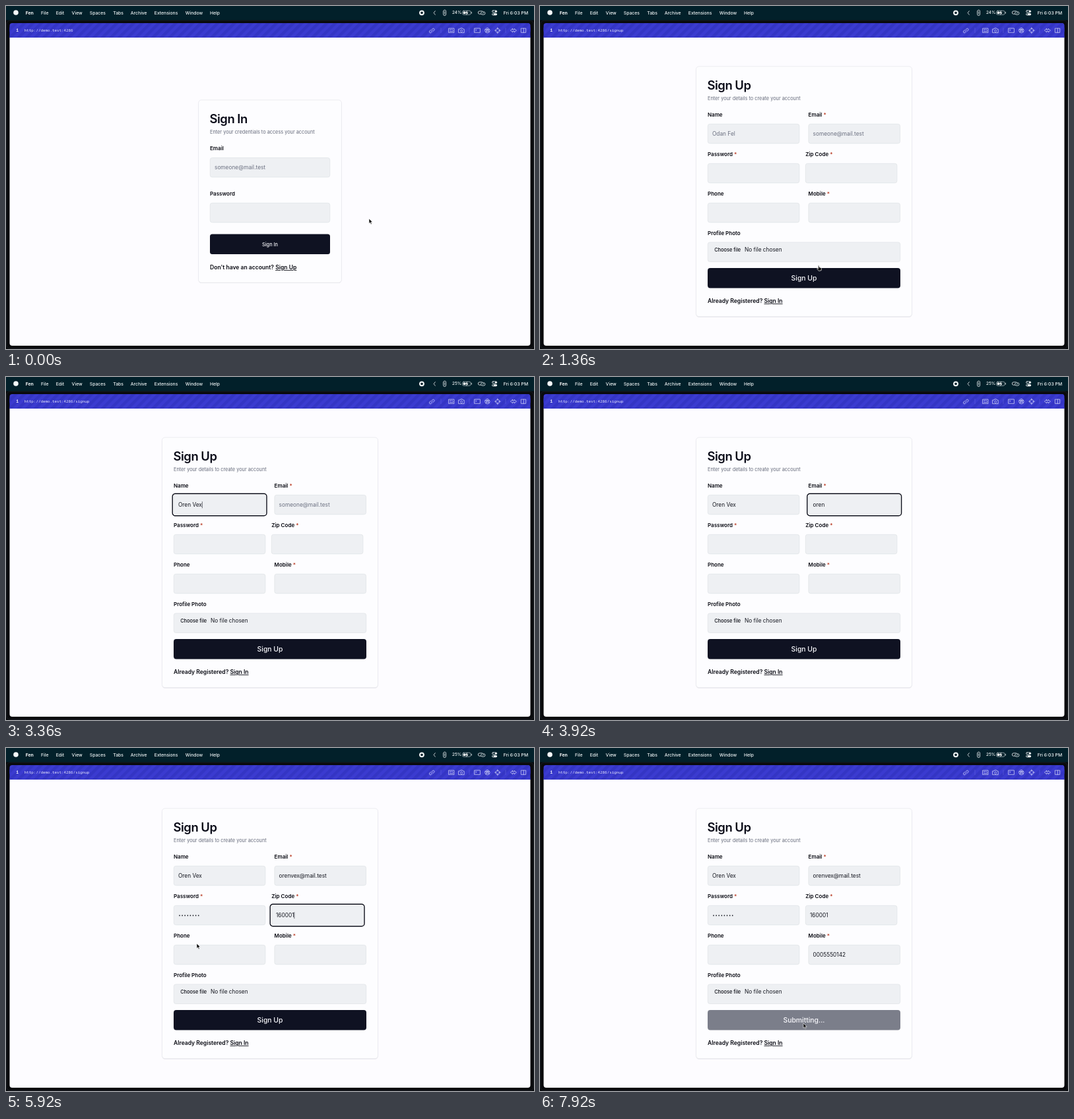
These frames come from a looping animation (800 by 521 pixels, 8 s). An HTML page:

```html
<!DOCTYPE html>
<html lang="en">
<head>
<meta charset="utf-8">
<title>Sign up form</title>
<style>
  html, body { margin: 0; width: 100%; height: 100%; overflow: hidden; background: #07090c; }
  svg { display: block; width: 800px; height: 521px; font-family: Inter, "Open Sans", sans-serif; }
  text { white-space: pre; }
  .menu { font-size: 6.8px; font-weight: 500; fill: #f4f7f8; }
  .mono { font: 5.87px "Noto Sans Mono", "DejaVu Sans Mono", monospace; fill: #e6e6fc; }
  .title { font-size: 18.4px; font-weight: 600; letter-spacing: -.025em; fill: #0a0b18; }
  .sub { font-size: 7.33px; fill: #666b7b; }
  .label { font-size: 8px; font-weight: 600; fill: #0b0c14; }
  .foot { font-size: 8.56px; font-weight: 600; fill: #0b0c14; }
  .foot tspan { text-decoration: underline; }
  .value { font-size: 8.3px; fill: #14161f; }
  .hint { fill: #6b7080; }
  .btn { font-weight: 500; fill: #f8f8fc; text-anchor: middle; }
  .field { fill: #eef0f3; stroke: #dfe2e6; stroke-width: .7; }
  .star { fill: #b93a22; }
  .line { fill: none; stroke: #f4f7f8; stroke-width: .8; stroke-linecap: round; stroke-linejoin: round; }
  .tool { stroke: #d5d6fa; stroke-width: .75; }
</style>
</head>
<body>
<svg id="stage" viewBox="0 0 800 521"></svg>
<script>
const stage = document.getElementById('stage');
const $ = id => document.getElementById(id);

const text = (x, y, cls, str, extra = '') => `<text x="${x}" y="${y}" class="${cls}" ${extra}>${str}</text>`;
const rect = (x, y, w, h, r, attrs) => `<rect x="${x}" y="${y}" width="${w}" height="${h}" rx="${r}" ${attrs}/>`;
const field = (x, y, w, h = 30) => rect(x + .3, y + .3, w - .6, h - .6, 3, 'class="field"');
const line = (d, cls = '') => `<path class="line ${cls}" d="${d}"/>`;
const star = '<tspan class="star"> *</tspan>';
const card = (x, y, w, h) =>
  rect(x, y + .9, w, h, 4.5, 'fill="#e6e6eb"') +
  rect(x, y, w, h, 4.5, 'fill="#fdfdff" stroke="#e8e8ed" stroke-width=".8"');

const menuItems = [['File', 53], ['Edit', 75.7], ['View', 99.6], ['Spaces', 126.8], ['Tabs', 162.3],
  ['Archive', 188.8], ['Extensions', 224.8], ['Window', 271.7], ['Help', 309]];

const menuBar = `
  <rect width="800" height="21.5" fill="#02202a"/>
  <circle cx="15" cy="10" r="3.8" fill="#f4f7f8"/>
  ${text(29.7, 12.5, 'menu', 'Fen', 'style="font-weight:700"')}
  ${menuItems.map(([s, x]) => text(x, 12.5, 'menu', s)).join('')}
  <circle cx="630" cy="10.3" r="3.9" fill="#f4f7f8"/><rect x="628.4" y="8.7" width="3.2" height="3.2" rx=".6" fill="#02202a"/>
  ${line('M650.3 7.6l-2.2 2.8 2.2 2.8')}
  ${line('M662.6 8v4.5a2 2 0 0 0 4 0v-4a1.9 1.9 0 0 0-3.8-1M664.6 8.5v3.6')}
  <text id="charge" x="676" y="12.4" class="menu" style="font-size:6.4px"></text>
  ${rect(691.6, 7.2, 12.4, 6, 1.8, 'class="line" style="stroke:#aab7bb"')}
  <rect x="692.8" y="8.4" width="3.6" height="3.6" rx=".8" fill="#fff"/>
  <path d="M699 6.5l-3 4.2h2l-.8 3.4 3.4-4.4h-2.1z" fill="#fff"/>
  ${line('M705.4 9.2v2')}
  ${line('M719.5 12.2h-2a2.2 2.2 0 0 1 0-4.4h3.6a2.2 2.2 0 0 1 1.6 3.7M721 8.9a2.2 2.2 0 0 0 1.2 4.2h1.6a2.2 2.2 0 0 0 0-4.4')}
  ${rect(736.6, 6.8, 7.2, 2.8, 1.4, 'class="line"')}<circle cx="742.2" cy="8.2" r="1.2" fill="#fff"/>
  ${rect(736.3, 10.9, 7.8, 3.3, 1.6, 'fill="#f4f7f8"')}<circle cx="738.1" cy="12.5" r="1" fill="#02202a"/>
  ${text(753.7, 12.5, 'menu', 'Fri 6:03 PM')}`;

const icon = (d) => line(d, 'tool');
const toolBar = `
  <path d="M5.5 48V30a4 4 0 0 1 4-4h781a4 4 0 0 1 4 4v18z" fill="#3b3bd0"/>
  <path d="M5.5 48V30a4 4 0 0 1 4-4h781a4 4 0 0 1 4 4v18z" fill="url(#stripes)"/>
  ${text(15.3, 39.3, 'mono', 'i', 'style="font-weight:700;font-size:6.5px"')}
  <text id="url" x="27.8" y="39.1" class="mono"></text>
  ${icon('M644 38.6l2.2-2.2M643.4 36.4l-1.6 1.6a1.7 1.7 0 0 0 2.4 2.4l1.3-1.3M644.8 35.9l1.4-1.4a1.7 1.7 0 0 1 2.4 2.4l-1.6 1.6')}
  ${icon('M671 34h8v6.4h-8zM672.5 36h2M672.5 38.6h5M676 35.4l1.6 2')}
  ${icon('M686 35h2l.8-1.3h2.6l.8 1.3h2v5.6H686zM690.1 36.2a1.6 1.6 0 1 0 .1 0')}
  ${icon('M710 33.9h8.4v6.4H710zM711.6 35.6l1.2 1-1.2 1')}
  ${icon('M729.3 33.4a3.7 3.7 0 1 0 .1 0M729.3 35.4a1.7 1.7 0 1 0 .1 0M726 35.5h6.6M727 40l2-3.6M732 39.8l-2-3.4')}
  ${icon('M744.8 34a3.1 3.1 0 1 0 .1 0M744.8 32.8v2.6M744.8 39v2.6M740.6 37.1h2.6M746.6 37.1h2.6')}
  ${icon('M767.6 34.3l-3.2 2.8 3.2 2.8v-1.6h2.6v1.6l3.2-2.8-3.2-2.8v1.6h-2.6z')}
  ${icon('M780.7 34h7v6.3h-7zM784.2 34v6.3')}
  ${[659, 702, 757].map(x => `<path d="M${x} 33v8" stroke="#5c5ddd" stroke-width=".7"/>`).join('')}`;

const signIn = `
  ${card(291.6, 142.8, 216.8, 277.4)}
  ${text(308.5, 178.4, 'title', 'Sign In')}
  ${text(309, 193.5, 'sub', 'Enter your credentials to access your account')}
  ${text(309, 219.3, 'label', 'Email')}
  ${field(309, 230.3, 182)}
  ${text(316, 248.4, 'value hint', 'someone@mail.test')}
  ${text(309, 287.8, 'label', 'Password')}
  ${field(309, 299, 182)}
  ${rect(309, 346.6, 182, 30.4, 3.5, 'fill="#0f1222"')}
  ${text(400, 364.5, 'btn', 'Sign In', 'style="font-size:7.4px"')}
  ${text(309, 400, 'foot', "Don't have an account? <tspan>Sign Up</tspan>")}`;

const inputs = {
  name:   { x: 254,   y: 179, word: 'Oren Vex', start: 2640, step: 90 },
  email:  { x: 406.6, y: 179, word: 'orenvex@mail.test', start: 3680, step: 70 },
  pass:   { x: 254,   y: 239, word: '********', start: 4960, step: 50 },
  zip:    { x: 402,   y: 239, word: '160001', start: 5440, step: 75 },
  mobile: { x: 406.6, y: 299, word: '0005550142', start: 6340, step: 60 }
};
const inputW = 139.2;

const signUp = `
  ${card(236.4, 91.8, 327.2, 380)}
  ${text(253.5, 127.3, 'title', 'Sign Up')}
  ${text(254, 142.6, 'sub', 'Enter your details to create your account')}
  ${text(254, 168, 'label', 'Name')}
  ${text(406.6, 168, 'label', 'Email' + star)}
  ${text(254, 228, 'label', 'Password' + star)}
  ${text(402.3, 228, 'label', 'Zip Code' + star)}
  ${text(254, 288, 'label', 'Phone')}
  ${text(406.6, 288, 'label', 'Mobile' + star)}
  ${text(254, 347.7, 'label', 'Profile Photo')}
  <g id="ring">
    ${rect(-1.8, -1.8, inputW + 3.6, 33.6, 4.2, 'fill="#fff" stroke="#0c0e1a" stroke-width="1.4"')}
  </g>
  ${Object.values(inputs).map(f => field(f.x, f.y, inputW)).join('')}
  ${field(254, 299, inputW)}
  ${field(254, 358.6, 292, 30.2)}
  ${text(264.2, 372.7, 'label', 'Choose file', 'style="font-size:7.4px;font-weight:500"')}
  ${text(310, 372.9, 'value', 'No file chosen')}
  ${Object.keys(inputs).map(k => text(inputs[k].x + 7, inputs[k].y + 18.4, 'value', '', `id="${k}"`)).join('')}
  <path id="dots" fill="none" stroke="#14161f" stroke-width="1.7" stroke-linecap="round" stroke-dasharray="0 4.1"/>
  <rect id="caret" width=".6" height="10" fill="#14161f"/>
  <rect id="submit" x="254" y="398" width="292" height="30.4" rx="4"/>
  ${text(400, 416.9, 'btn', '', 'id="submitText" style="font-size:10.4px"')}
  ${text(254, 451, 'foot', 'Already Registered? <tspan>Sign In</tspan>')}`;

const pointers = `
  <g id="pointer" stroke-linejoin="round">
    <path id="arrow" d="M0 0v7.4l1.7-1.6 1.2 2.7 1.3-.6-1.2-2.6h2.3z" fill="#0a0a0a" stroke="#fff" stroke-width=".6"/>
    <path id="hand" d="M-.6 .2c.5-.5 1.1-.2 1.3 .4l.6 2.3 2 .5c.9 .3 1.2 .8 1.1 1.7l-.3 2.6-3.6 .7-2.6-3c-.4-.7 .2-1.2 .9-.8l.8 .5z" fill="#0a0a0a" stroke="#fff" stroke-width=".7"/>
    <path id="beam" d="M-1.6-4q1.6 0 1.6 1.1 0-1.1 1.6-1.1M0-2.9v5.8M-1.6 4q1.6 0 1.6-1.1 0 1.1 1.6 1.1M-.8 .8h1.6" fill="none" stroke="#0a0a0a" stroke-width=".75"/>
  </g>`;

stage.innerHTML = `
  <defs><pattern id="stripes" width="9" height="9" patternUnits="userSpaceOnUse" patternTransform="rotate(45)">
    <rect width="4.5" height="9" fill="#3435c4"/></pattern></defs>
  <rect width="800" height="521" fill="#07090c"/>
  ${rect(.6, 22, 798.8, 498.4, 6, 'fill="#090a0d" stroke="#20252a" stroke-width=".7"')}
  ${menuBar}${toolBar}
  <path d="M5.5 48h789v464a4 4 0 0 1-4 4h-781a4 4 0 0 1-4-4z" fill="#fdfcff"/>
  <g id="signIn">${signIn}</g><g id="signUp">${signUp}</g>${pointers}`;

// Pointer stops: time, x, y
const stops = [[0, 550, 323], [100, 550, 323], [720, 424, 396], [1200, 424, 396], [1340, 422, 394], [1480, 422, 394],
  [2160, 284.5, 193.5], [5800, 284.5, 193.5], [5920, 289, 297], [6160, 440, 313], [6860, 440, 313],
  [7190, 394, 428], [7220, 394, 428], [7480, 399, 418], [8000, 399, 418]];
// Focus changes: time, input
const focus = [[0, ''], [2280, 'name'], [3560, 'email'], [4900, 'pass'], [5380, 'zip'], [6200, 'mobile'], [7600, '']];

const clamp = (v, lo, hi) => Math.min(hi, Math.max(lo, v));
const show = (id, on) => { $(id).style.display = on ? '' : 'none'; };
const put = (id, s) => { if ($(id).textContent !== s) $(id).textContent = s; };

function pointerAt(t) {
  const i = Math.max(1, stops.findIndex(s => s[0] > t));
  const [t0, x0, y0] = stops[i - 1], [t1, x1, y1] = stops[i];
  const p = (t - t0) / (t1 - t0), e = p * p * (3 - 2 * p);
  return [x0 + (x1 - x0) * e, y0 + (y1 - y0) * e];
}

function draw(t) {
  const onSignUp = t >= 960, sending = t >= 7600;
  show('signIn', !onSignUp);
  show('signUp', onSignUp);
  put('url', 'http://demo.test:4286' + (onSignUp ? '/signup' : ''));
  put('charge', t < 3000 ? '24%' : '25%');

  const typed = {};
  for (const [k, f] of Object.entries(inputs)) {
    typed[k] = clamp(Math.floor((t - f.start) / f.step) + 1, 0, f.word.length);
    if (k === 'pass') continue;
    const hint = { name: 'Odan Fel', email: 'someone@mail.test' }[k] || '';
    put(k, typed[k] ? f.word.slice(0, typed[k]) : hint);
    $(k).classList.toggle('hint', !typed[k]);
  }
  $('dots').setAttribute('d', typed.pass ? `M263 254.4h${(typed.pass - 1) * 4.1 + .1}` : '');

  const active = focus.filter(f => f[0] <= t).pop()[1];
  show('ring', active);
  show('caret', active && (t + 1160) % 1200 >= 600);
  if (active) {
    const { x, y } = inputs[active], n = typed[active];
    const width = !n ? 0 : active === 'pass' ? n * 4.1 : $(active).getComputedTextLength();
    $('ring').setAttribute('transform', `translate(${x} ${y})`);
    $('caret').setAttribute('x', x + 7 + width);
    $('caret').setAttribute('y', y + 10.2);
  }

  const hover = clamp((t - 7060) / 120, 0, 1);
  const shade = [15, 18, 34].map(c => Math.round(c + 14 * hover));
  $('submit').setAttribute('fill', sending ? '#7b7e8a' : `rgb(${shade})`);
  put('submitText', sending ? 'Submitting...' : 'Sign Up');

  const [x, y] = pointerAt(t);
  $('pointer').setAttribute('transform', `translate(${x} ${y})`);
  const hand = t >= 680 && t < 1500;
  const beam = (t >= 2080 && t < 5840) || (t >= 6080 && t < 6920);
  show('hand', hand);
  show('beam', beam);
  show('arrow', !hand && !beam);
  show('pointer', !(t >= 2640 && t < 5800) && !(t >= 6340 && t < 6860));
}

let begin;
function tick(now) {
  begin ??= now;
  draw((now - begin) % 8000);
  requestAnimationFrame(tick);
}
draw(0);
requestAnimationFrame(tick);
</script>
</body>
</html>
```
